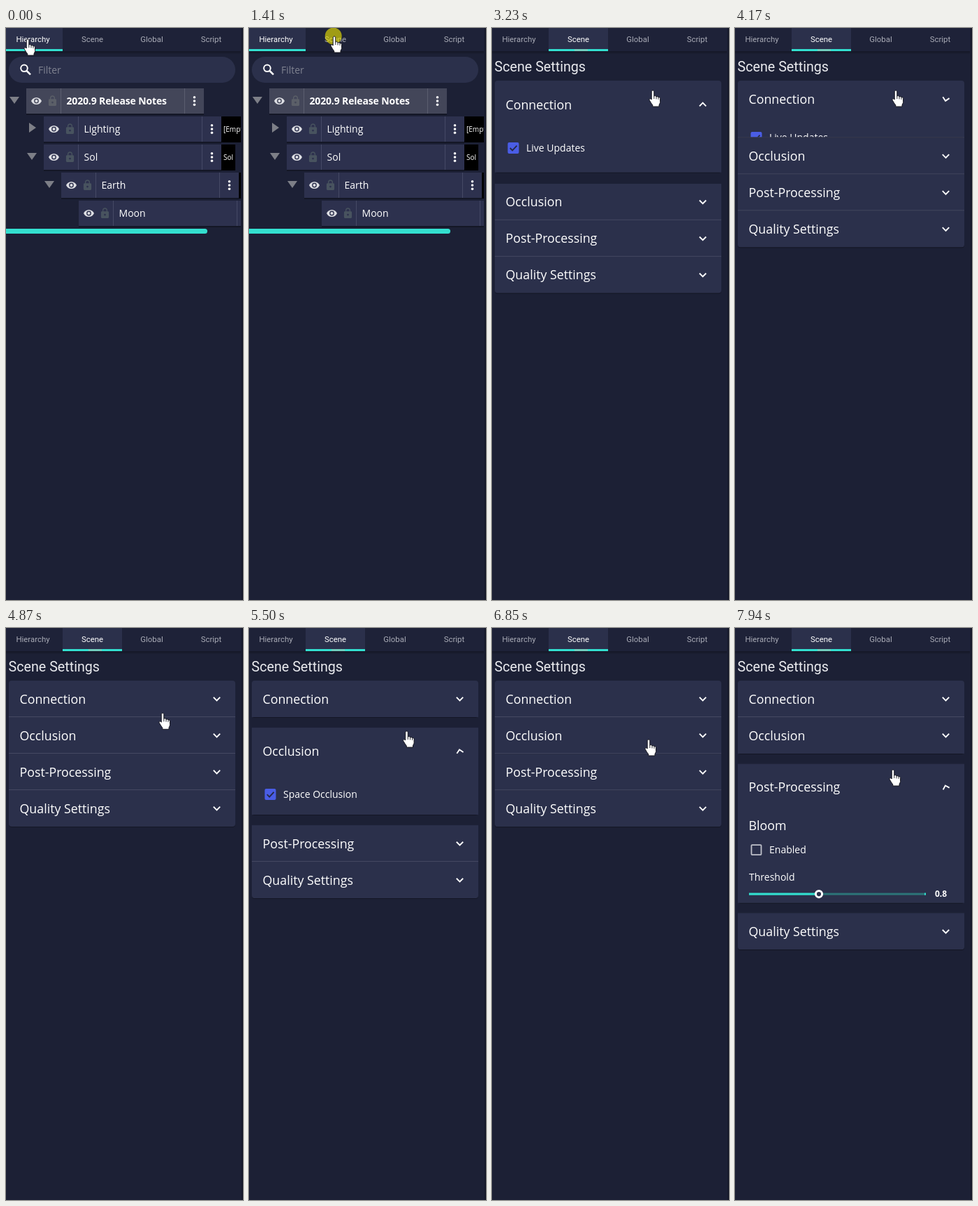
Write an HTML page that moves like this. It is 339 px wide and 815 px high and loops after 8 s.

```html
<!DOCTYPE html>
<html lang="en">
<head>
<meta charset="utf-8">
<title>Scene settings panel</title>
<style>
  html, body { margin: 0; height: 100%; overflow: hidden; background: #1c2035; }
  #stage { display: block; width: 100vw; height: 100vh; }
  text { font: 14px 'Open Sans', sans-serif; fill: #fff; white-space: pre; }
  .tab { font: 11.4px Roboto, sans-serif; fill: #a9abb6; text-anchor: middle; }
  .tab.on { fill: #fff; }
  .title { font: 19.7px Roboto, sans-serif; fill: #e9eaee; }
  .head { font-size: 17.8px; }
  .bold { font-weight: 700; letter-spacing: -.15px; }
  .tag { font-size: 10px; }
  .value { font-size: 12px; font-weight: 700; }
  .hint { fill: #7f8290; }
</style>
</head>
<body>
<svg id="stage" viewBox="0 0 339 815" preserveAspectRatio="none"></svg>
<script>
const LOOP = 8000, STEP = 78.65;
const TEAL = '#33dfcf', PANEL = '#2b304b';
const stage = document.getElementById('stage');

const rect = (x, y, w, h, fill, extra = '') =>
  `<rect x="${x}" y="${y}" width="${w}" height="${h}" fill="${fill}" ${extra}/>`;
const text = (x, y, s, cls = '') => `<text x="${x}" y="${y}" class="${cls}">${s}</text>`;
const icon = (d, cx, cy, scale, fill) =>
  `<path d="${d}" fill="${fill}" fill-rule="evenodd" transform="translate(${cx} ${cy}) scale(${scale}) translate(-12 -12)"/>`;

const EYE = 'M12 4.5C7 4.5 2.7 7.6 1 12c1.7 4.4 6 7.5 11 7.5s9.3-3.1 11-7.5c-1.7-4.4-6-7.5-11-7.5z' +
  'M12 17a5 5 0 1 1 0-10 5 5 0 0 1 0 10zM12 9a3 3 0 1 0 0 6 3 3 0 0 0 0-6z';
const LOCK = 'M18 8h-1V6A5 5 0 0 0 7 6v2H6a2 2 0 0 0-2 2v10a2 2 0 0 0 2 2h12a2 2 0 0 0 2-2V10a2 2 0 0 0-2-2z' +
  'M12 17a2 2 0 1 1 0-4 2 2 0 0 1 0 4zM15.1 8H8.9V6a3.1 3.1 0 0 1 6.2 0z';
const HAND = 'M-1.8 1.8C-1.8-.6 1.8-.6 1.8 1.8V8.2C2.6 7 5 7.4 5 9.2 6 8.2 7.8 8.6 8 10 9 9.2 10.6 10 10.6 11.6' +
  'V16.5C10.6 18.5 9 19.5 9 21V23H-.2V21C-2 18.8-3 16.8-4.6 14.2-5.8 12-3.5 10.6-1.8 13Z';

// Hierarchy view
function treeRow(depth, i, name, { arrow, tag, tagW = 0, root } = {}) {
  const x = 29 + depth * 25, y = 86 + i * 40, c = y + 18;
  const line = dx => rect(x + dx, y, 1, 36, root ? '#5b5e6f' : '#454965');
  const ax = x - 17;
  const arrows = {
    down: `M${ax - 7} ${c - 6}h14l-7 10z`,
    right: `M${ax - 4} ${c - 9}v14l10-7z`
  };
  return rect(x, y + 1, 254, 37, '#000', 'opacity=".28"') +
    (tagW ? rect(x + 254, y, tagW, 37, '#000') : '') +
    rect(x, y, 254, 36, root ? '#434659' : '#2d314e') + line(49) + line(226) +
    icon(EYE, x + 14.5, c, .68, '#dcdde2') +
    icon(LOCK, x + 37.5, c, .7, root ? '#5b5f68' : '#48535f') +
    text(x + 57.5, c + 5, name, root ? 'bold' : '') +
    [-5.3, 0, 5.3].map(d => `<circle cx="${x + 240.5}" cy="${c + d}" r="1.8" fill="#fff"/>`).join('') +
    (arrow ? `<path d="${arrows[arrow]}" fill="#7d7f87"/>` : '') +
    (tag ? text(x + 257, c + 4, tag, 'tag') : '');
}

const tree = rect(4, 41, 324, 37, PANEL, 'rx="18.5"') +
  '<g fill="none" stroke="#fff"><circle cx="26" cy="57.3" r="4.8" stroke-width="2"/>' +
  '<path d="M29.6 61l5.4 5.4" stroke-width="2.5"/></g>' +
  text(46, 65, 'Filter', 'hint') +
  treeRow(0, 0, '2020.9 Release Notes', { arrow: 'down', root: true }) +
  treeRow(1, 1, 'Lighting', { arrow: 'right', tag: '[Empty]', tagW: 40 }) +
  treeRow(1, 2, 'Sol', { arrow: 'down', tag: 'Sol', tagW: 20 }) +
  treeRow(2, 3, 'Earth', { arrow: 'down', tagW: 20 }) +
  treeRow(3, 4, 'Moon') +
  rect(-10, 286, 298, 7, TEAL, 'rx="3.5"');

// Scene view: x is relative to the panel, y to the bottom of its header
function checkbox(y, label, on) {
  const box = on
    ? rect(18.5, y - 8, 16, 16, '#4a5de6', 'rx="2"') +
      `<path d="M21.8 ${y}l3.4 3.5 6.4-6.8" fill="none" stroke="#262a48" stroke-width="1.9"/>`
    : rect(19.5, y - 7, 14, 14, 'none', 'rx="1" stroke="#bfc1ca" stroke-width="1.8"');
  return box + text(45, y + 5, label);
}

const slider = text(16, 100, 'Threshold') +
  rect(16, 117.5, 253, 3, '#2c7478') + rect(16, 117.5, 100, 3, TEAL) + rect(267, 117.5, 2, 3, TEAL) +
  `<circle cx="116" cy="119" r="4.6" fill="${PANEL}" stroke="#fff" stroke-width="3"/>` +
  text(282, 123, '0.8', 'value');

const panels = [
  { title: 'Connection', size: 63, body: checkbox(28, 'Live Updates', true), opens: 2960, closes: 4058 },
  { title: 'Occlusion', size: 101, opens: 5395, closes: 6575,
    body: checkbox(28, 'Space Occlusion', true) + checkbox(66, 'Hand Occlusion', false) },
  { title: 'Post-Processing', size: 270, opens: 7842, closes: Infinity,
    body: text(15.5, 28, 'Bloom', 'head') + checkbox(56, 'Enabled', false) + slider },
  { title: 'Quality Settings', size: 0, body: '', opens: Infinity, closes: Infinity }
];

const tabs = ['Hierarchy', 'Scene', 'Global', 'Script'];
const tabX = [38.5, 123.5, 208.5, 293.5];

stage.innerHTML = rect(0, 0, 339, 815, '#1c2035') +
  rect(0, 33, 336, 2, '#000', 'opacity=".22"') + rect(0, 35, 336, 2, '#000', 'opacity=".1"') +
  rect(0, 0, 336, 33, '#1e2238') +
  rect(0, 0, 81, 33, PANEL, 'id="active"') +
  '<svg x="81" width="85" height="33"><circle id="ripple" cx="40" cy="12" fill="#fff"/></svg>' +
  tabs.map((s, i) => text(tabX[i], 20, s, 'tab')).join('') +
  rect(0, 30, 81, 3, TEAL, 'id="mark"') + rect(118, 30, 19, 3, '#72cdbd', 'id="glint"') +
  `<svg id="tree" width="336" height="815">${tree}</svg>` +
  '<g id="scene">' + text(3.5, 62, 'Scene Settings', 'title') +
  panels.map((p, i) => '<g class="panel">' +
    rect(4, 1, 324, 52, '#000', 'class="shade" rx="4" opacity=".3"') +
    '<svg class="box" x="4" width="324">' +
    rect(0, i === 3 ? -10 : 0, 324, 500, PANEL, `class="back" rx="${i % 3 ? 0 : 4}"`) +
    `<g class="top">${text(15.5, 6.5, p.title, 'head')}` +
    '<path class="chev" d="M-4.7-2.3L0 2.4 4.7-2.3" fill="none" stroke="#fff" stroke-width="1.9"/></g>' +
    `<g class="body">${p.body}</g></svg>` +
    rect(4, -1, 324, 1, '#454962', 'class="line"') + '</g>').join('') + '</g>' +
  rect(337, 0, 2, 815, '#151828') +
  '<circle id="click" r="12" fill="#f0e600" opacity=".62"/>' +
  `<g id="hand"><path d="${HAND}" fill="#fff" stroke="#14151d" stroke-linejoin="round"/>` +
  '<path d="M1.8 8v4M5 9.2v3.2M8 10.2v2.6" stroke="#14151d" stroke-width=".9"/></g>';

const $ = id => document.getElementById(id);
const set = (el, attrs) => { for (const k in attrs) el.setAttribute(k, attrs[k]); };
const show = (el, on) => { el.style.display = on ? '' : 'none'; };
const clamp = v => Math.min(1, Math.max(0, v));
const tabEls = [...stage.querySelectorAll('.tab')];
[...stage.querySelectorAll('.panel')].forEach((g, i) => {
  panels[i].el = g;
  for (const k of ['shade', 'box', 'back', 'top', 'chev', 'body', 'line']) panels[i][k] = g.querySelector('.' + k);
});

// cubic-bezier(.4, 0, .2, 1)
function ease(x) {
  x = clamp(x);
  let lo = 0, hi = 1, s = .5;
  for (let i = 0; i < 24; i++) {
    s = (lo + hi) / 2;
    const r = 1 - s;
    if (1.2 * r * r * s + .6 * r * s * s + s * s * s < x) lo = s; else hi = s;
  }
  return s * s * (3 - 2 * s);
}
const both = u => u * u * (3 - 2 * u), speedUp = u => u ** 1.5, slowDown = u => 1 - (1 - u) ** 2;

// [start, end, x, y, easing]: pointer moves to x, y
const moves = [
  [710, 1170, 122, 12, both], [2060, 2660, 230, 89, both],
  [4640, 4870, 224, 121, speedUp], [4870, 5105, 225.5, 147, slowDown],
  [6140, 6208, 225.5, 148.5, both], [6208, 6365, 224, 159, slowDown],
  [6930, 7070, 226, 182, both], [7160, 7385, 226, 202, both]
];
const clicks = [[1400, 1500], [2890, 2950], [3990, 4050], [5250, 5400], [6430, 6580], [7690, 7840]];
const SWITCH = 1500;

function pointer(t) {
  let x = 31, y = 16;
  for (const [a, b, nx, ny, fn] of moves) {
    const u = fn(clamp((t - a) / (b - a)));
    x += (nx - x) * u;
    y += (ny - y) * u;
  }
  return [x, y];
}

const progress = (p, t, dur) => t < p.closes ? ease((t - p.opens) / dur) : 1 - ease((t - p.closes) / dur);

function layout(t) {
  let y = 75, prev = 0;
  panels.forEach((p, i) => {
    const open = progress(p, t, 150), grow = progress(p, t, 280);
    const header = 52 + 16 * open, h = header + p.size * grow;
    if (i) y += 16 * Math.max(open, prev);
    set(p.el, { transform: `translate(0 ${y})` });
    set(p.shade, { height: h });
    set(p.box, { height: h });
    if (i === 3) set(p.back, { height: h + 10 });
    set(p.top, { transform: `translate(0 ${header / 2})` });
    set(p.chev, { transform: `translate(297.5 0) rotate(${180 * open})` });
    set(p.body, { transform: `translate(0 ${header})` });
    set(p.line, { opacity: i ? 1 - Math.max(open, prev) : 0 });
    y += h;
    prev = open;
  });
}

function draw(ms) {
  const t = Math.floor((ms + 15) / STEP) * STEP - 5;
  const scene = t >= SWITCH;
  show($('tree'), !scene);
  show($('scene'), scene);
  tabEls.forEach((el, i) => el.classList.toggle('on', i === +scene));
  set($('active'), { x: scene ? 81 : 0, width: scene ? 85 : 81 });

  const slide = ease((t - SWITCH) / 300);
  set($('mark'), { x: 81 * slide, width: 81 + 4 * slide });
  show($('glint'), slide === 1 || t > SWITCH + 300);
  set($('ripple'), {
    r: 75 * ease((t - 1440) / 500),
    opacity: .13 * (1 - ease((t - 1560) / 500))
  });

  layout(t);

  const [x, y] = pointer(t);
  set($('hand'), { transform: `translate(${x} ${y})` });
  set($('click'), { cx: x - 1.3, cy: y - .5 });
  show($('click'), clicks.some(([a, b]) => t >= a && t < b));
}

const start = performance.now();
function tick() {
  draw((performance.now() - start) % LOOP);
  requestAnimationFrame(tick);
}
tick();
</script>
</body>
</html>
```
